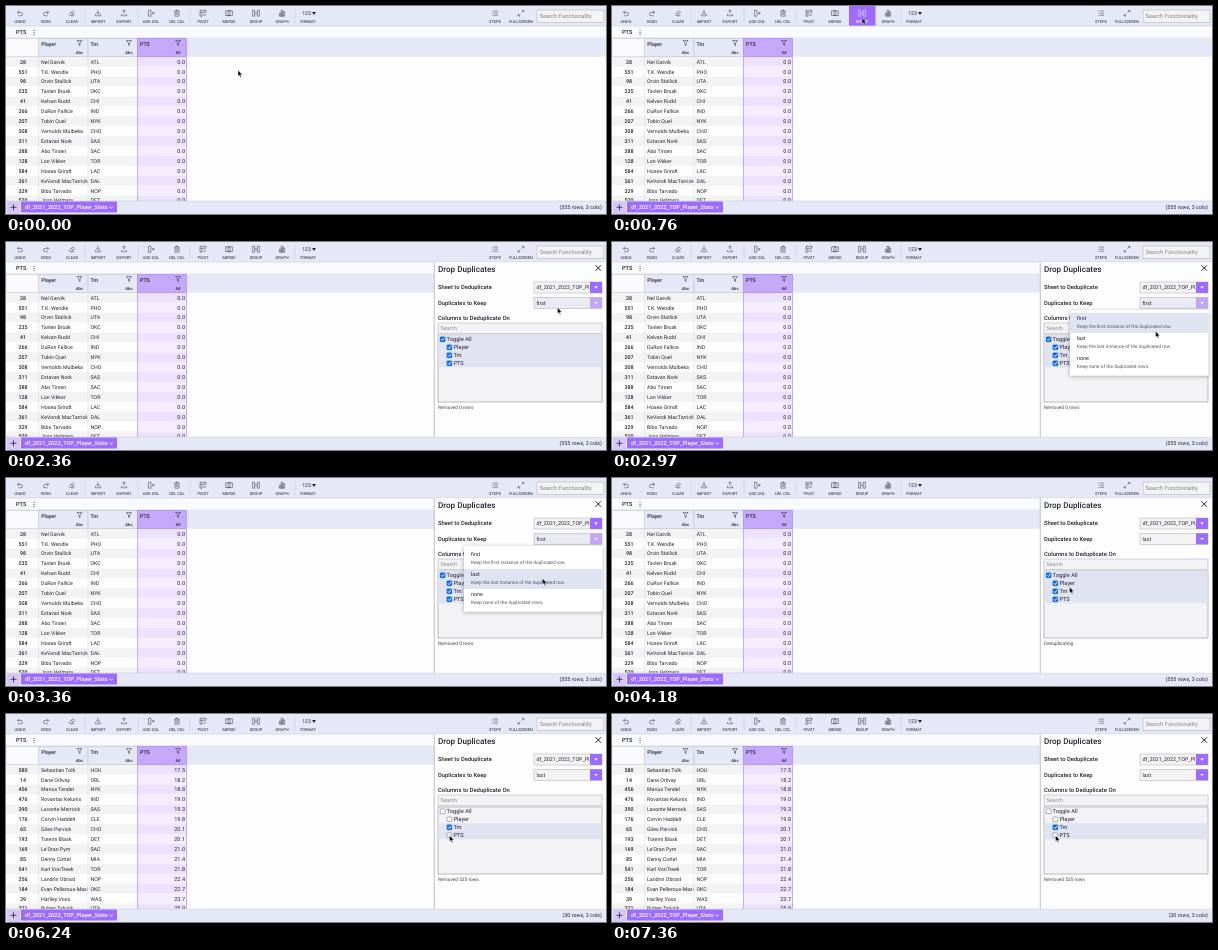
An HTML page for the animation above (7.45 s loop, 600x208 px).

```html
<!DOCTYPE html>
<html lang="en">
<head>
<meta charset="utf-8">
<style>
html, body { margin: 0; width: 100%; height: 100%; overflow: hidden; background: #fdfdfe; }
svg { display: block; width: 600px; height: 208px; }
text { font-family: Roboto, Inter, sans-serif; white-space: pre; text-rendering: geometricPrecision; }
</style>
</head>
<body>
<svg id="stage" viewBox="0 0 600 208"></svg>
<script>
const LOOP = 7450;
const INK = '#252530', BAR = '#e5e8f6', PALE = '#dfe3f2', LINE = '#c3c5d0';
const PAPER = '#fdfdfe', FIELD = '#f3f3f5', PURPLE = '#9d6cff', EDGE = '#a67df5';

const rect = (x, y, w, h, fill, stroke = 'none', extra = '') =>
  `<rect x="${x}" y="${y}" width="${w}" height="${h}" fill="${fill}" stroke="${stroke}" stroke-width=".6" ${extra}/>`;
const text = (x, y, s, size, { fill = INK, weight = 400, anchor = 'start', extra = '' } = {}) =>
  `<text x="${x}" y="${y}" font-size="${size}" fill="${fill}" font-weight="${weight}" text-anchor="${anchor}" ${extra}>${s}</text>`;
const path = (d, stroke = INK, width = .7, fill = 'none', extra = '') =>
  `<path d="${d}" stroke="${stroke}" stroke-width="${width}" fill="${fill}" ${extra}/>`;
const group = (id, body, extra = '') => `<g id="${id}" ${extra}>${body}</g>`;
const bold = { weight: 500 }, middle = { anchor: 'middle' };

// Toolbar: label, centre x, icon path around (0,0)
const tools = [
  ['UNDO', 14, 'M-1-3L-3-1L-1 1M-3-1H1a2 2 0 0 1 0 4H-2'],
  ['REDO', 40, 'M1-3L3-1L1 1M3-1H-1a2 2 0 0 0 0 4H2'],
  ['CLEAR', 66, 'M-3 1L1-3L3-1L-1 3H-2ZM-1-1L1 1M-1 3H3'],
  ['IMPORT', 92, 'M0-4V1M-2-1L0 1L2-1M-3 1V3H3V1'],
  ['EXPORT', 118, 'M0 1V-4M-2-2L0-4L2-2M-3 1V3H3V1'],
  ['ADD COL', 145, 'M-3-3.5H0V3.5H-3ZM1.2 0H4.2M2.7-1.5V1.5'],
  ['DEL COL', 171, 'M-3-2.5H3M-1-2.5V-3.7H1V-2.5M-2.3-2.5V3.5H2.3V-2.5M-.8-1V2M.8-1V2'],
  ['PIVOT', 197, 'M-3.5-3.5H3.5V-1.2H-3.5ZM-3.5-1.2V3.5H-1.2V-1.2M.5 2.5H2.5V.3'],
  ['MERGE', 223, 'M-4-2.8H1.2V2.8H-4ZM-1.2-2.8H4V2.8H-1.2Z'],
  ['DEDUP', 250, 'M-4-3.5H-1.5V3.5H-4ZM1.5-3.5H4V3.5H1.5ZM-1.5 0H1.5'],
  ['GRAPH', 276, 'M-3 3.5V0H-1V3.5M-1 3.5V-3.5H1V3.5M1 3.5V-1.5H3V3.5H-3'],
  ['FORMAT', 302, ''],
  ['STEPS', 489, 'M-1.5-2.5H3.5M-1.5 0H3.5M-1.5 2.5H3.5M-3.5-2.5H-2.5M-3.5 0H-2.5M-3.5 2.5H-2.5'],
  ['FULLSCREEN', 515, 'M.8-.8L3.3-3.3M1-3.3H3.3V-1M-.8.8L-3.3 3.3M-1 3.3H-3.3V1'],
];
const tool = ([name, x, d], color = INK) =>
  path(d, color, .7, 'none', `transform="translate(${x} 7.2) scale(.85)" opacity=".8"`) +
  text(x, 17.2, name, 4, { ...middle, fill: color });

const toolbar = rect(0, 0, 600, 20, BAR) + tools.map(t => tool(t)).join('') +
  [79, 132, 184, 289].map(x => path(`M${x} 3V17`, LINE, .5)).join('') +
  text(300.5, 9.3, '123', 5.2, middle) + path('M306 6H310L308 9Z', 'none', 0, INK) +
  rect(531, 4, 67, 12.5, FIELD, '#b4b6c0') + text(533.5, 12.3, 'Search Functionality', 5.8, { fill: '#85858e' }) +
  rect(0, 20, 600, 12, '#f9fafd') + path('M0 20H600M0 32H600', LINE, .5) +
  text(10, 28, 'PTS', 5.6, bold) +
  [24, 26, 28].map(y => rect(27.6, y, .9, .9, INK)).join('');

const header = (x, w, name, type, picked) =>
  rect(x, 32.3, w, 18.4, picked ? '#c6a8fb' : BAR, picked ? EDGE : LINE) +
  text(x + 2.5, 40.3, name, 5.3, bold) +
  path(`M${x + w - 11} 34.5h5l-2 2.6v2.6l-1-.8v-1.8z`, INK, .5) +
  text(x + w - 8.5, 48, type, 4.2, { ...middle, weight: 500 });

const early = `28|Nel Garvik|ATL
551|T.K. Wendle|PHO
98|Orvin Stallick|UTA
235|Tavlen Brusk|OKC
41|Kelvan Rudd|CHI
266|DuRon Fallice|IND
207|Tobin Quel|NYK
308|Vernolds Mulbeka|CHO
311|Estavan Nork|SAS
388|Abo Tirsen|SAC
128|Lon Vikker|TOR
584|Hosea Grindt|LAC
361|KeVondi MacTarrick|DAL
329|Bibo Tarvado|NOP
520|Joss Helmery|DET`;
const late = `580|Sebastian Tolk|HOU|17.5
14|Dane Orlivay|ORL|18.2
456|Marius Tendel|NYK|18.8
476|Rovantas Kelunis|IND|19.0
390|Lavonte Merrock|SAS|19.3
176|Corvin Haddelt|CLE|19.8
65|Giles Parvick|CHO|20.1
193|Toremi Blask|DET|20.1
169|Le'Oran Pym|SAC|21.0
85|Denny Cottel|MIA|21.4
541|Karl VonTreek|TOR|21.8
256|Landrin Obrast|NOP|22.4
184|Evan Pellerous-Maximand|OKC|22.7
39|Harlley Voss|WAS|23.7
371|Ruben Talvick|UTA|25.9`;
const rowTop = i => 50.8 + 9.92 * i;
const rows = list => list.split('\n').map((line, i) => {
  const [id, name, team, pts = '0.0'] = line.split('|');
  const base = rowTop(i) + 6.8;
  return text(17, base, id, 5.3, { ...middle, weight: 500 }) +
    text(35, base, name, 5.25, { extra: 'clip-path="url(#nameCol)"' }) +
    text(84.5, base, team, 5.25) + text(179, base, pts, 5.5, { anchor: 'end' });
}).join('');
let stripes = '';
for (let i = 0; i < 15; i++) {
  stripes += rect(0, rowTop(i), 181, 9.92, i % 2 ? PAPER : '#f3f3f4') +
    rect(131.5, rowTop(i), 49, 9.92, i % 2 ? '#f4edfe' : '#ede2fd');
}
const table = rect(0, 32, 600, 18.7, BAR) + rect(0, 32.3, 33, 18.4, '#fafafc', LINE) +
  `<g clip-path="url(#grid)">${stripes}${group('early', rows(early))}${group('late', rows(late))}</g>` +
  path('M32.7 51V195M82 51V195', '#d3d4dc', .5) + path('M131.5 51V195M180.5 51V195', EDGE, .6) +
  header(32.7, 49.3, 'Player', 'Abc') + header(82, 49.5, 'Tm', 'Abc') + header(131.5, 49, 'PTS', '##', true);

const sheet = 'df_2021_2022_TOP_Player_Stats';
const footer = rect(0, 195, 600, 13, BAR) + path('M0 195H600', LINE, .5) +
  rect(1, 195.5, 13, 12.5, '#d6c6fa') + path('M4.5 201.3H10.5M7.5 198.3V204.3', INK, .8) +
  rect(15, 195.5, 96, 11, PURPLE) + text(19, 203.2, sheet, 5.6, { fill: '#fff', weight: 500 }) +
  path('M103.5 200.5L105.2 202.3L107 200.5', '#fff', .8) +
  text(596, 203.2, '', 5.4, { anchor: 'end', extra: 'id="count"' });

const select = (y, id) => rect(528, y, 68, 11, FIELD, '#b4b6c0', `id="${id}Box"`) +
  rect(584, y, 12, 11, PURPLE, 'none', `id="${id}Arrow"`) +
  path(`M588.3 ${y + 4.6}h3.6l-1.8 2.2z`, 'none', 0, '#fff');
const checks = ['Toggle All', 'Player', 'Tm', 'PTS'].map((name, i) => {
  const x = i ? 441 : 434.2, y = 93.3 + 8 * i;
  return rect(432.4, y, 163.2, 8, PALE, 'none', `id="line${i}"`) +
    rect(x, y + 1.6, 4.8, 4.8, '#fff', '#777', 'rx=".8"') +
    group('tick' + i, rect(x - .2, y + 1.4, 5.2, 5.2, '#0b70e8', 'none', 'rx=".8"') +
      path(`M${x + 1} ${y + 4}l1.2 1.3l1.9-2.7`, '#fff', .9)) +
    text(x + 6.4, y + 5.9, name, 5.7);
}).join('');
const options = ['first', 'last', 'none'].map((name, i) => {
  const y = 71 + 20 * i;
  const tail = i < 2 ? `the ${name} instance of the duplicated row.` : 'none of the duplicated rows.';
  return rect(458, y, 138.5, 20, PALE, 'none', `id="option${i}"`) +
    text(465, y + 7.2, name, 5.4) + text(465, y + 15, 'Keep ' + tail, 4.8, { fill: '#555560' });
}).join('');
const panel = group('panel',
  rect(428, 20.3, 172, 174.5, PAPER) + path('M428.3 20.3V195', '#a5a7b0', .7) +
  text(432, 30, 'Drop Duplicates', 8.1, bold) + path('M589.5 23.3L595 28.8M595 23.3L589.5 28.8', INK, 1) +
  text(432, 47.2, 'Sheet to Deduplicate', 5.8, bold) + select(40, 'sheet') +
  text(530.5, 47.3, sheet, 5.3, { extra: 'clip-path="url(#sheetClip)"' }) +
  text(432, 62.5, 'Duplicates to Keep', 5.8, bold) + select(55.3, 'keep') +
  text(530.5, 62.6, '', 5.3, { extra: 'id="keep"' }) +
  text(432, 78, 'Columns to Deduplicate On', 5.9, bold) +
  rect(432, 81, 164, 10.3, FIELD, '#b4b6c0') + text(434.5, 88, 'Search', 5.4, { fill: '#8a8a94' }) +
  rect(432, 93, 164, 67, FIELD, '#8f919c') + checks +
  text(432, 167, '', 4.8, { fill: '#44444c', extra: 'id="message"' }) +
  group('menu', rect(458, 68, 138.5, 65.5, '#fff', 'none', 'filter="url(#shadow)"') + options));

document.getElementById('stage').innerHTML = `<defs>
  <clipPath id="nameCol"><rect x="33" y="50" width="48.7" height="146"/></clipPath>
  <clipPath id="grid"><rect x="0" y="50.7" width="182" height="144.3"/></clipPath>
  <clipPath id="sheetClip"><rect x="528" y="40" width="56" height="11"/></clipPath>
  <filter id="shadow" x="-10%" y="-10%" width="120%" height="130%"><feDropShadow dx="0" dy="1" stdDeviation="2" flood-opacity=".3"/></filter>
  </defs>` + toolbar +
  group('dedup', rect(237, 0, 26.5, 19.7, PURPLE) + tool(tools[9], '#fff')) +
  table + footer +
  rect(424, 51, 3, 9.5, '#777', 'none', 'id="thumb" rx="1.5"') + panel +
  path('M0 0V6L1.4 4.8L2.4 7L3.4 6.5L2.4 4.4H4.3Z', '#fff', .4, '#000', 'id="cursor"');

const el = id => document.getElementById(id);
const show = (id, on) => el(id).setAttribute('display', on ? 'inline' : 'none');
const write = (id, s) => { if (el(id).textContent !== s) el(id).textContent = s; };

// Pointer stops: time, x, y
const stops = [
  [30, 232, 64.3], [700, 250, 12], [1020, 251, 12], [1270, 266.5, 20.5], [1520, 335, 43], [2240, 551.5, 65.5],
  [2560, 551.5, 65.5], [3050, 543, 91], [3360, 536.5, 100.5], [3600, 534, 102], [4180, 457.5, 109],
  [4580, 444, 104.5], [4850, 444, 104.5], [5200, 443.5, 121.5], [LOOP, 443.5, 121.5],
];
function pointer(t) {
  const i = stops.findIndex(s => t <= s[0]);
  if (i < 1) return stops[0].slice(1);
  const [t0, x0, y0] = stops[i - 1], [t1, x1, y1] = stops[i];
  const u = (t - t0) / (t1 - t0), k = u * u * (3 - 2 * u);
  return [x0 + (x1 - x0) * k, y0 + (y1 - y0) * k];
}

// Busy spans of the deduplication: start, end
const busy = [[950, 1620], [3720, 4420], [4800, 5450], [5450, 6200]];

function draw(t) {
  const [x, y] = pointer(t);
  const between = (a, b) => t >= a && t < b;
  el('cursor').setAttribute('transform', `translate(${x} ${y})`);
  show('dedup', between(480, 1310));
  show('panel', t >= 920);
  show('thumb', between(1000, 1500));
  show('early', t < 5960);
  show('late', t >= 5960);
  write('count', `(${t < 5960 ? 555 : 30} rows, 3 cols)`);

  const open = between(2500, 3600), hot = between(2180, 3660);
  show('menu', open);
  for (let i = 0; i < 3; i++) show('option' + i, open && y >= 71 + 20 * i && y < 91 + 20 * i);
  el('keepBox').setAttribute('fill', hot ? '#e9eaf4' : FIELD);
  el('keepArrow').setAttribute('fill', hot ? '#c3a8f5' : PURPLE);
  write('keep', t < 3600 ? 'first' : 'last');

  [t < 4740, t < 4740, true, t < 5450].forEach((on, i) => {
    const top = 93.3 + 8 * i;
    show('tick' + i, on);
    show('line' + i, on || (x > 432 && y >= top && y < top + 8));
  });
  const span = busy.find(([a, b]) => between(a, b));
  write('message', span ? 'Deduplicating ' + '.'.repeat(1 + Math.floor((t - span[0]) / 500))
    : `Removed ${t < 6200 ? 0 : 525} rows`);
}

const start = performance.now();
function frame() {
  draw((performance.now() - start) % LOOP);
  requestAnimationFrame(frame);
}
frame();
</script>
</body>
</html>
```
